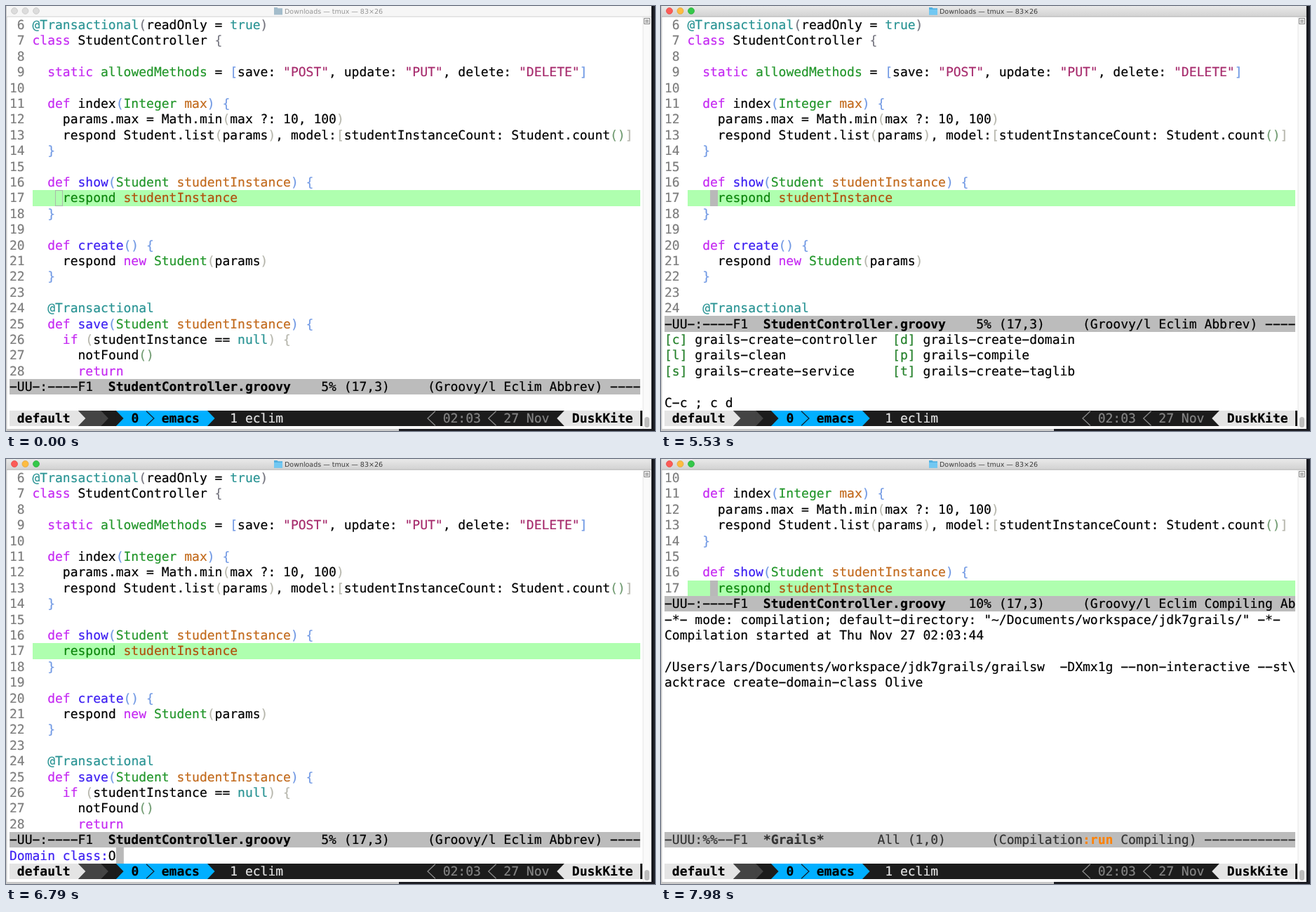
These frames come from a looping animation (925 px wide and 605 px high, 8000 ms). An HTML page:

```html
<!DOCTYPE html>
<html lang="en">
<head>
<meta charset="utf-8">
<title>Terminal</title>
<style>
html, body { margin: 0; width: 100%; height: 100%; overflow: hidden; background: #fff; }
svg { display: block; width: 925px; height: 605px; }
text { font: 18px "DejaVu Sans Mono", "Liberation Mono", monospace; white-space: pre;
  text-rendering: geometricPrecision; fill: currentColor; stroke: currentColor; stroke-width: .2px; color: #000; }
text.title { font: 9.5px "DejaVu Sans", sans-serif; stroke: none; }
.cell { shape-rendering: crispEdges; }

.n { color: #7d7d7d } .k { color: #c52af2 } .t { color: #22962a } .v { color: #c26a1c }
.f { color: #3c1ff2 } .c { color: #2a9494 } .s { color: #a62a6c } .g { color: #0c860c }
.o { color: #b0500c } .m { color: #24802a } .dim { color: #333 }
.p1 { color: #74747e } .p2 { color: #7199e4 } .p3 { color: #b6b6ac } .p4 { color: #6f9a70 }
.b, .run { font-weight: bold } .run { color: #ff8205 } .clock { color: #858585 } .pale { color: #e4e4e4 }

.anim { animation: 8s step-end infinite; }
#idle { animation-name: idle } #active { animation-name: active } #point { animation-name: point }
#code, #hollow { visibility: visible } #code { animation-name: code } #tail { animation-name: tail }
#menu { animation-name: menu } #keys1 { animation-name: keys1 } #keys2 { animation-name: keys2 }
#prompt { animation-name: prompt } #caret { animation-name: caret } #build { animation-name: build }
#l0 { animation-name: l0 } #l1 { animation-name: l1 } #l2 { animation-name: l2 }
#l3 { animation-name: l3 } #l4 { animation-name: l4 }
@keyframes idle { 0% { visibility: visible } 6.125%, 100% { visibility: hidden } }
@keyframes active { 0% { visibility: hidden } 6.125%, 100% { visibility: visible } }
@keyframes point { 0%, 70% { visibility: hidden } 6.125% { visibility: visible } 100% { visibility: hidden } }
@keyframes code { 0% { visibility: visible } 96.25%, 100% { visibility: hidden } }
@keyframes tail { 0%, 70% { visibility: visible } 36.75%, 96.25%, 100% { visibility: hidden } }
@keyframes menu { 0%, 70%, 100% { visibility: hidden } 36.75% { visibility: visible } }
@keyframes keys1 { 0%, 69.125%, 100% { visibility: hidden } 36.75% { visibility: visible } }
@keyframes keys2 { 0%, 70%, 100% { visibility: hidden } 69.125% { visibility: visible } }
@keyframes prompt { 0%, 96.25%, 100% { visibility: hidden } 70% { visibility: visible } }
@keyframes build { 0% { visibility: hidden } 96.25%, 100% { visibility: visible } }
@keyframes l0 { 0%, 96.25%, 100% { visibility: hidden } 84.875% { visibility: visible } }
@keyframes l1 { 0%, 96.25%, 100% { visibility: hidden } 87.5% { visibility: visible } }
@keyframes l2 { 0%, 96.25%, 100% { visibility: hidden } 89.25% { visibility: visible } }
@keyframes l3 { 0%, 96.25%, 100% { visibility: hidden } 91% { visibility: visible } }
@keyframes l4 { 0%, 96.25%, 100% { visibility: hidden } 92.75% { visibility: visible } }
@keyframes caret {
  0% { transform: none }
  84.875% { transform: translateX(10.836px) }
  87.5% { transform: translateX(21.672px) }
  89.25% { transform: translateX(32.508px) }
  91% { transform: translateX(43.344px) }
  92.75% { transform: translateX(54.18px) }
  95.375%, 100% { transform: translateX(-140.868px) }
}
</style>
</head>
<body>
<svg viewBox="0 0 925 605">
  <defs>
    <linearGradient id="bar" x2="0" y2="1"><stop stop-color="#e9e9e9"/><stop offset="1" stop-color="#d2d2d2"/></linearGradient>
    <linearGradient id="edge"><stop stop-color="#0c0d11"/><stop offset="1" stop-color="#23262f"/></linearGradient>
  </defs>
  <rect width="925" height="605" fill="#c9c9c9"/>
  <rect x="919.5" width="5.5" height="605" fill="url(#edge)"/>
  <rect x="560" y="602" width="365" height="3" fill="#1b1c22"/>
  <rect x="1.5" width="918" height="602" fill="#fff"/>

  <g id="idle" class="anim">
    <rect x="1" width="918.5" height="15" fill="#f6f6f6"/>
    <path d="M1 15.2H919.5" stroke="#d2d2d2"/>
    <g fill="#dcdcdc" stroke="#c6c6c6" stroke-width=".8"><circle cx="12" cy="7" r="4.4"/><circle cx="27.5" cy="7" r="4.4"/><circle cx="43" cy="7" r="4.4"/></g>
    <path d="M382 2h4.500l1.200 1.300h6.300v9.200h-12z" fill="#a3bccb"/>
    <text class="title" x="397" y="10.500" style="color:#969696">Downloads — tmux — 83×26</text>
  </g>
  <g id="active" class="anim">
    <rect x="1" width="918.5" height="15" fill="url(#bar)"/>
    <path d="M1 15.200H919.500" stroke="#b2b2b2"/>
    <g stroke-width=".7"><circle cx="12" cy="7" r="4.500" fill="#fc5b57" stroke="#e2443f"/><circle cx="27.500" cy="7" r="4.500" fill="#fdbc40" stroke="#de9f34"/><circle cx="43" cy="7" r="4.500" fill="#34c84a" stroke="#27aa35"/></g>
    <path d="M382 2h4.500l1.200 1.300h6.300v9.200h-12z" fill="#52b1e2"/>
    <path d="M382 5h12v7.500h-12z" fill="#72c8f2"/>
    <text class="title" x="397" y="10.500" style="color:#3c3c3c">Downloads — tmux — 83×26</text>
  </g>

  <path d="M908 16h11.500v586h-11.500z" fill="#fafafa"/>
  <path d="M908 16V602" stroke="#e4e4e4"/>
  <path d="M909.500 17.500h8v8h-8zM911 20h5M911 21.700h5M911 23.300h5" fill="#fff" stroke="#777" stroke-width=".9"/>
  <rect x="910" y="585" width="7" height="15" rx="3.500" fill="#bdbdbd"/>

  <g id="code" class="anim"></g>
  <g id="tail" class="anim"></g>
  <g id="menu" class="anim"></g>
  <g id="keys1" class="anim"></g>
  <g id="keys2" class="anim"></g>
  <g id="prompt" class="anim"></g>
  <g id="build" class="anim"></g>
  <g id="status"></g>
</svg>
<script>
const CW = 10.836, CH = 22.4, LEFT = 5, TOP = 15.8;
const $ = id => document.getElementById(id);
const x = col => LEFT + col * CW;
const y = row => TOP + row * CH;

function add(parent, tag, attrs, text) {
  const el = document.createElementNS('http://www.w3.org/2000/svg', tag);
  for (const key in attrs) el.setAttribute(key, attrs[key]);
  if (text) el.textContent = text;
  return parent.appendChild(el);
}

// Cells are filled from one column up to another.
const fill = (g, row, from, to, color) => add(g, 'rect',
  { class: 'cell', x: x(from), y: y(row), width: (to - from) * CW, height: CH, fill: color });

// Coloured runs are written <class|text>; hyphens are drawn wide.
function write(g, row, col, line, cls = '') {
  const text = add(g, 'text', { y: y(row) + 17.2, class: cls });
  for (const [run, kind, body] of line.matchAll(/<(\w+)\|(.*?)>|[^<]+/g)) {
    const str = body ?? run;
    add(text, 'tspan', { x: x(col), class: kind || '' }, str.replace(/-/g, '−'));
    col += str.length;
  }
  return text;
}

function modeline(g, row, line, cls) {
  fill(g, row, 0, 83, '#bcbcbc');
  write(g, row, 0, line, cls);
}

const FIRST = 6, CURRENT = 17;
const source = [
  '<c|@Transactional><p1|(>readOnly = <c|true><p1|)>',
  '<k|class> StudentController <p1|{>',
  '',
  '  <k|static> <t|allowedMethods> = <p2|[>save: <s|"POST">, update: <s|"PUT">, delete: <s|"DELETE"><p2|]>',
  '',
  '  <k|def> index<p2|(><t|Integer> <v|max><p2|)> <p2|{>',
  '    params.max = Math.min<p3|(>max ?: 10, 100<p3|)>',
  '    respond Student.list<p3|(>params<p3|)>, model:<p3|[>studentInstanceCount: Student.count<p4|()><p3|]>',
  '  <p2|}>',
  '',
  '  <k|def> <f|show><p2|(><t|Student> <v|studentInstance><p2|)> <p2|{>',
  '    <g|respond> <o|studentInstance>',
  '  <p2|}>',
  '',
  '  <k|def> <f|create><p2|()> <p2|{>',
  '    respond <k|new> <t|Student><p3|(>params<p3|)>',
  '  <p2|}>',
  '',
  '  <c|@Transactional>',
  '  <k|def> <f|save><p2|(><t|Student> <v|studentInstance><p2|)> <p2|{>',
  '    <k|if> <p3|(>studentInstance == <c|null><p3|)> <p3|{>',
  '      notFound<p4|()>',
  '      <k|return>'
];

function listing(g, from, to, row) {
  for (let n = from; n <= to; n++, row++) {
    if (n === CURRENT) fill(g, row, 3, 83, '#afffaf');
    write(g, row, 0, `<n|${String(n).padStart(2)}> ${source[n - FIRST]}`);
  }
}

const mode = '-UU-:----F1  <b|StudentController.groovy>    5% (17,3)     (Groovy/l Eclim Abbrev) ----';
const CURSOR = '#b9b9b9';

listing($('code'), 6, 24, 0);
fill($('code'), 11, 6, 7, CURSOR).id = 'point';
$('point').classList.add('anim');
add($('idle'), 'g', {});
const hollow = fill($('code'), 11, 6, 7, 'none');
hollow.setAttribute('stroke', '#a9b9a9');
hollow.classList.add('anim');
hollow.style.animationName = 'idle';

listing($('tail'), 25, 28, 19);
modeline($('tail'), 23, mode);

modeline($('menu'), 19, mode);
[['c', 'create-controller', 'd', 'create-domain'],
 ['l', 'clean', 'p', 'compile'],
 ['s', 'create-service', 't', 'create-taglib']].forEach(([a, left, b, right], i) => {
  write($('menu'), 20 + i, 0, `<m|[${a}]> grails-${left}`);
  write($('menu'), 20 + i, 30, `<m|[${b}]> grails-${right}`);
});
write($('keys1'), 24, 0, 'C-c ; c-');
write($('keys2'), 24, 0, 'C-c ; c d');

const caret = fill($('prompt'), 24, 13, 14, CURSOR);
caret.id = 'caret';
caret.classList.add('anim');
write($('prompt'), 24, 0, '<f|Domain class:>');
[...'Olive'].forEach((ch, i) => {
  write($('prompt'), 24, 13 + i, ch, 'anim').id = 'l' + i;
});

const build = $('build');
listing(build, 10, 17, 0);
fill(build, 7, 6, 7, CURSOR);
modeline(build, 8, '-UU-:----F1  <b|StudentController.groovy>   10% (17,3)     (Groovy/l Eclim Compiling Ab');
write(build, 9, 0, '-*- mode: compilation; default-directory: "~/Documents/workspace/jdk7grails/" -*-');
write(build, 10, 0, 'Compilation started at Thu Nov 27 02:03:44');
write(build, 12, 0, '/Users/lars/Documents/workspace/jdk7grails/grailsw  -DXmx1g --non-interactive --st\\');
write(build, 13, 0, 'acktrace create-domain-class Olive');
modeline(build, 23, '-UUU:%%--F1  <b|*Grails*>       All (1,0)      (Compilation<run|:run> Compiling) ------------', 'dim');

const status = $('status'), ROW = 25;
function arrow(col, color, dir = 1) {
  const base = x(dir > 0 ? col : col + 1);
  add(status, 'path', { d: `M${base} ${y(ROW)}l${dir * CW} ${CH / 2}l${-dir * CW} ${CH / 2}z`, fill: color });
}
function chevron(col, color, dir = 1) {
  const base = x(dir > 0 ? col : col + 1);
  add(status, 'path', { d: `M${base} ${y(ROW) + 1}l${dir * CW} ${CH / 2 - 1}l${-dir * CW} ${CH / 2 - 1}`,
    fill: 'none', stroke: color, 'stroke-width': 1.3 });
}
fill(status, ROW, 0, 83.25, '#1c1c1c');
fill(status, ROW, 0, 9, '#e4e4e4');
fill(status, ROW, 9, 12, '#444');
arrow(9, '#e4e4e4');
arrow(12, '#444');
fill(status, ROW, 14, 26, '#00afff');
arrow(14, '#1c1c1c');
arrow(26, '#00afff');
chevron(18, '#123');
chevron(55, '#8a8a8a', -1);
chevron(63, '#8a8a8a', -1);
fill(status, ROW, 73, 83, '#e4e4e4');
arrow(72, '#e4e4e4', -1);
write(status, ROW, 1, 'default', 'b');
write(status, ROW, 16, '0', 'b');
write(status, ROW, 20, 'emacs', 'b');
write(status, ROW, 29, '1 eclim', 'pale');
write(status, ROW, 57, '02:03', 'clock');
write(status, ROW, 65, '27 Nov', 'clock');
write(status, ROW, 74, 'DuskKite', 'b');
</script>
</body>
</html>
```
